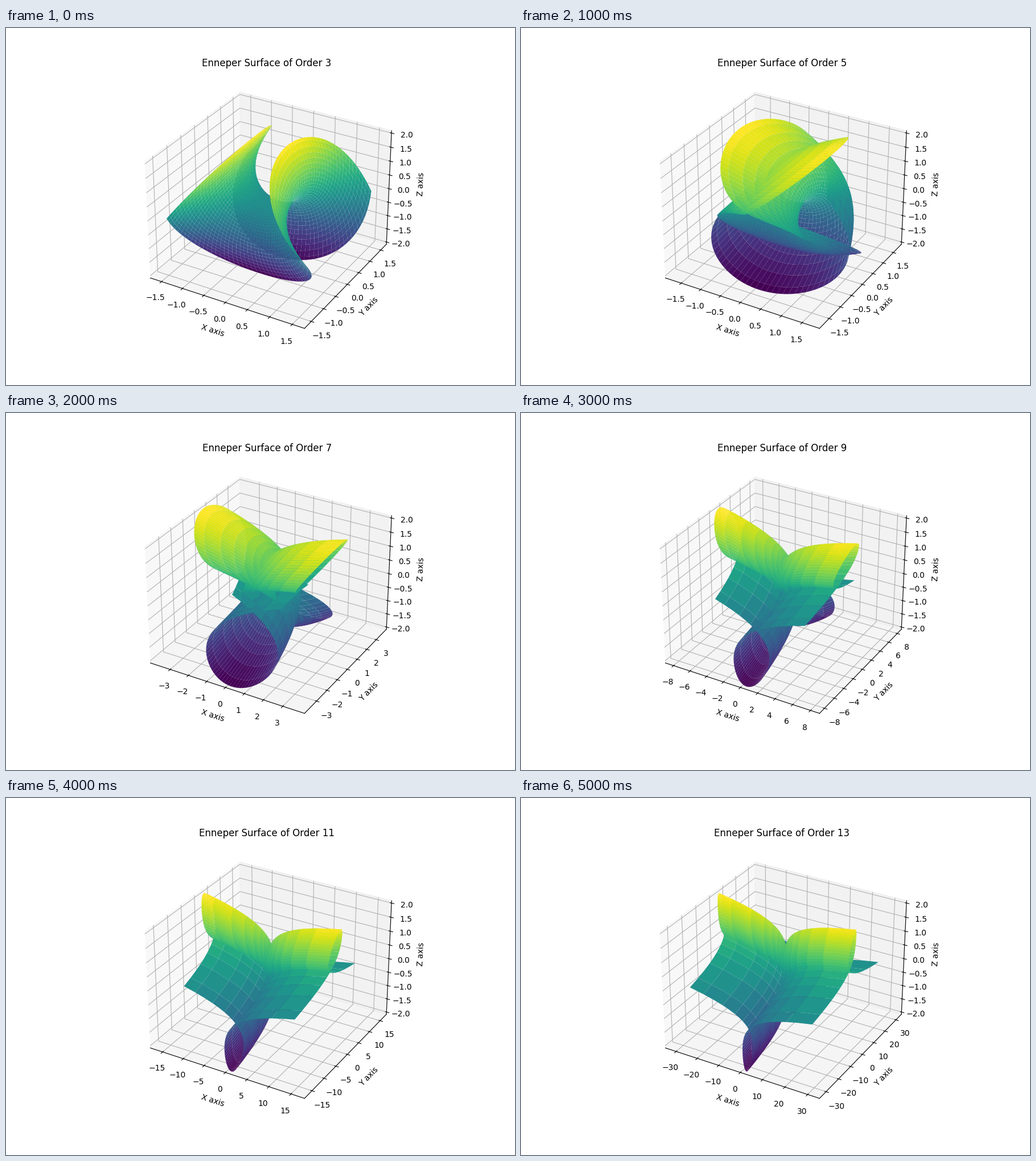
These frames come from a looping animation (894 by 626 pixels, 6000 ms). A matplotlib script:

```python
import numpy as np
import matplotlib.pyplot as plt
from matplotlib.animation import FuncAnimation

ORDERS = [3, 5, 7, 9, 11, 13]
STEPS = [0.5, 0.5, 1, 2, 5, 10]  # tick spacing on x and y
PANE = 25 / 24  # walls stand a little outside the limits

side = np.linspace(-1.5, 1.5, 100)
U, V = np.meshgrid(side, side)


def coord(a, b, order):
    """Truncated odd series in a, bent by b."""
    total = a.copy()
    for k in range(3, order + 1, 2):
        total += (a * b**2 - a**k) / k
    return total


def ticks(limit, step):
    n = int(limit / step)
    return np.arange(-n, n + 1) * step


fig = plt.figure(figsize=(8.94, 6.26), dpi=100)
ax = fig.add_subplot(111, projection="3d")


def draw(i):
    order, step = ORDERS[i], STEPS[i]
    x, y = coord(U, V, order), coord(V, U, order)
    z = U**2 - V**2

    ax.clear()
    ax.plot_surface(x, y, z, cmap="viridis")

    limit = 1.1 * np.abs(x).max()
    ax.set_xticks(ticks(limit, step))
    ax.set_yticks(ticks(limit, step))
    ax.set_zticks(ticks(2, 0.5))
    ax.set_xlim(-limit * PANE, limit * PANE)
    ax.set_ylim(-limit * PANE, limit * PANE)
    ax.set_zlim(-2 * PANE, 2 * PANE)

    ax.set_xlabel("X axis")
    ax.set_ylabel("Y axis")
    ax.set_zlabel("Z axis")
    ax.set_title(f"Enneper Surface of Order {order}")
    return []


anim = FuncAnimation(fig, draw, frames=len(ORDERS), interval=1000,
                     repeat=True, repeat_delay=0, blit=False)
plt.show()
```
